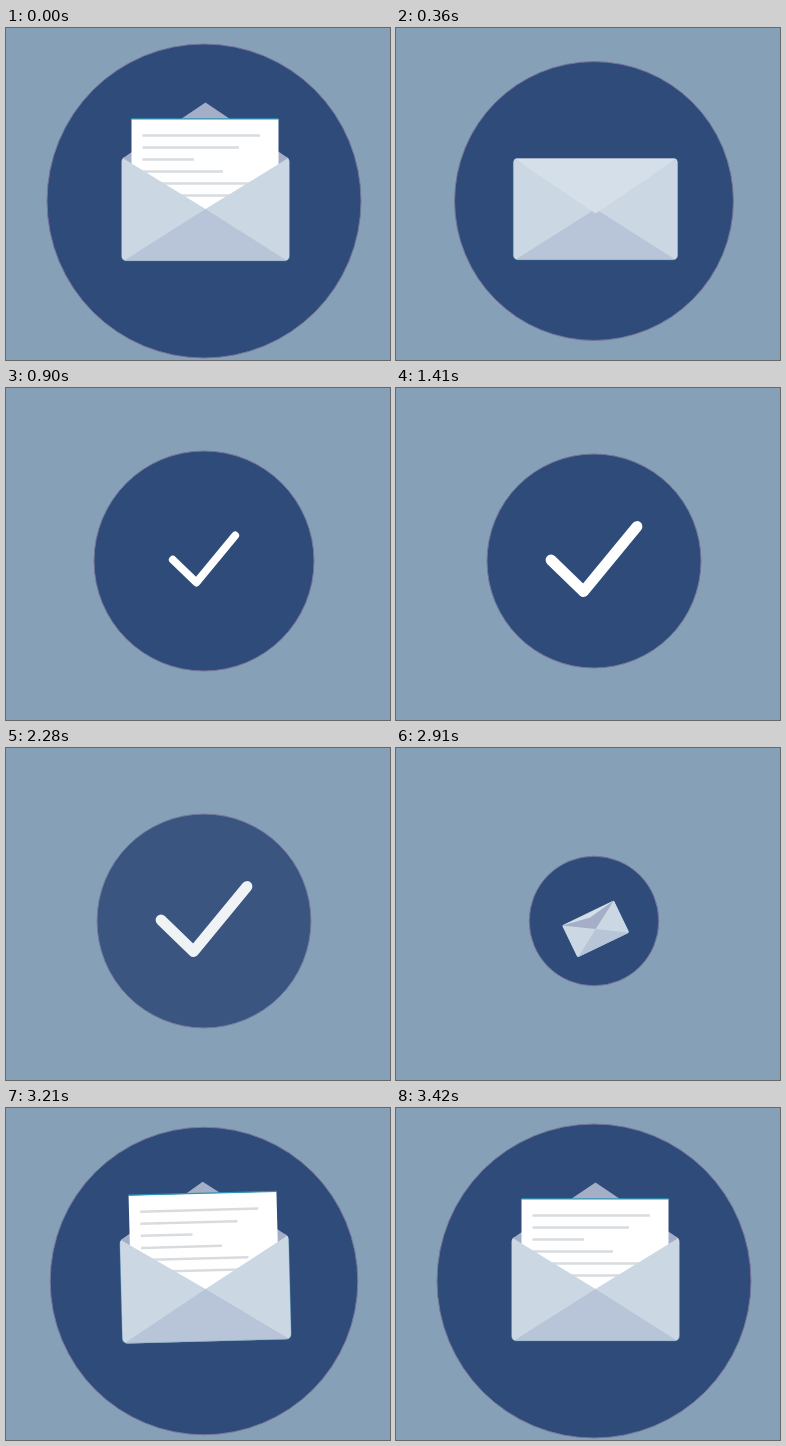
Write an HTML page that moves like this. It is 384x332 px and loops after 3.45 s.

```html
<!DOCTYPE html>
<html lang="en">
<head>
<meta charset="utf-8">
<title>Envelope and check</title>
<style>
  html, body { margin: 0; width: 100%; height: 100%; overflow: hidden; background: #86a1b7; }
  svg { display: block; width: 100vw; height: 100vh; }
</style>
</head>
<body>
<svg viewBox="0 0 384 332">
  <defs>
    <clipPath id="mouth"><rect x="100" y="0" width="200" height="231"/></clipPath>
    <clipPath id="body"><rect x="115.5" y="129" width="168" height="104" rx="5"/></clipPath>
  </defs>
  <g id="scene">
    <circle id="disc" cx="198" cy="173" r="157" fill="#2f4b79" stroke="#77759b" stroke-width="1"/>
    <g id="envelope">
      <path id="flapBack" d="M117 130L199.500 74.500L282 130Z" fill="#a4afc7"/>
      <path d="M116 133Q116 129 120 129H279Q283 129 283 133L199.500 183Z" fill="#a4afc7"/>
      <g clip-path="url(#mouth)">
        <g id="letter">
          <rect x="125.500" y="91" width="147" height="100" fill="#fff"/>
          <path d="M125.500 90.800H272.500" stroke="#2d93b4" stroke-width="1.200"/>
          <g id="lines" stroke="#d9dcdf" stroke-width="2.500"></g>
        </g>
      </g>
      <g clip-path="url(#body)">
        <path d="M115 129L199.500 181L284 129V234H115Z" fill="#cbd8e4"/>
        <path d="M115 234.500L199.500 181L284 234.500Z" fill="#b8c4d7"/>
      </g>
      <path d="M115.500 132V228Q115.500 233 120.500 233H278.500Q283.500 233 283.500 228V132"
            fill="none" stroke="#4489a8" stroke-opacity=".45" stroke-width=".8"/>
      <path id="flapFront" d="M117 130L199.500 74.500L282 130Z" fill="#d5dfe9"/>
    </g>
    <path id="check" d="M155 172L187.500 203.500L241 138.500" fill="none" stroke="#fff"
          stroke-width="10.800" stroke-linecap="round" stroke-linejoin="round"/>
  </g>
</svg>
<script>
const LOOP = 3450, STEP = 30;
const $ = id => document.getElementById(id);
const set = (id, name, value) => $(id).setAttribute(name, value);

const ease = {
  lin: p => p,
  in: p => p * p,
  out: p => 1 - (1 - p) * (1 - p),
  both: p => p * p * (3 - 2 * p)
};

// Each key: time, value, easing on the way to it.
const tracks = {
  radius: [[0, 157], [240, 157], [540, 107], [780, 107], [870, 110.5, 'out'], [900, 110],
    [1200, 107], [2580, 107], [2880, 0, 'lin'], [3030, 180, 'out'], [3060, 181],
    [3180, 153], [3300, 158], [3420, 157]],
  fade: [[0, 1], [2250, 1], [2280, .88, 'lin'], [2580, 0, 'lin'], [2880, 0], [2910, 1, 'lin']],
  letterY: [[0, 0], [210, 95], [3040, 95], [3210, -5, 'out'], [3330, 0]],
  flap: [[0, 1], [150, 1], [330, -1], [2880, -1], [3030, 1.09, 'out'], [3150, 1]],
  envScale: [[0, 1], [330, 1], [540, 0, 'in'], [2880, 0], [3030, .955, 'out'],
    [3120, 1.04], [3240, 1]],
  turn: [[0, 0], [2870, 0], [2880, -30], [3030, -8.8, 'lin'], [3120, 4, 'out'],
    [3210, -1.5], [3300, 0]],
  shift: [[0, 0], [2880, 0], [3030, 1.5], [3150, 0]],
  checkScale: [[0, 9], [540, 9], [660, 6, 'lin'], [885, .71, 'lin'], [900, .725],
    [1290, 1, 'out']],
  checkFade: [[0, 0], [540, 0], [660, .165, 'lin'], [840, 1, 'lin'], [2600, 1], [2610, 0]]
};

function at(name, t) {
  const keys = tracks[name];
  const i = keys.findIndex(k => k[0] > t);
  if (i < 0) return keys[keys.length - 1][1];
  const [t0, v0] = keys[i - 1], [t1, v1, how = 'both'] = keys[i];
  return v0 + (v1 - v0) * ease[how]((t - t0) / (t1 - t0));
}

const zoom = (x, y, s) => `translate(${x} ${y}) scale(${s}) translate(${-x} ${-y})`;

[254, 233, 188, 217, 243, 243].forEach((end, i) => {
  const line = document.createElementNS('http://www.w3.org/2000/svg', 'path');
  line.setAttribute('d', `M136.500 ${107.500 + 12 * i}H${end}`);
  $('lines').append(line);
});

function draw(t) {
  const radius = at('radius', t), scale = at('envScale', t), flap = at('flap', t);
  const shift = at('shift', t);
  set('scene', 'opacity', at('fade', t));
  set('disc', 'r', radius);
  set('envelope', 'visibility', scale > .001 ? 'visible' : 'hidden');
  set('envelope', 'transform',
    `translate(${shift} ${-shift / 3}) rotate(${at('turn', t)} 199.5 181) ${zoom(199.5, 181, scale)}`);
  set('letter', 'transform', `translate(0 ${at('letterY', t)})`);
  for (const [id, shown] of [['flapBack', flap > 0], ['flapFront', flap < 0]]) {
    set(id, 'display', shown ? 'inline' : 'none');
    set(id, 'transform', `translate(0 130) scale(1 ${flap}) translate(0 -130)`);
  }
  set('check', 'opacity', at('checkFade', t));
  set('check', 'transform', zoom(198, 171, at('checkScale', t)));
}

const start = performance.now();
function tick() {
  const t = (performance.now() - start) % LOOP;
  draw(Math.floor(t / STEP) * STEP);
  requestAnimationFrame(tick);
}
tick();
</script>
</body>
</html>
```
